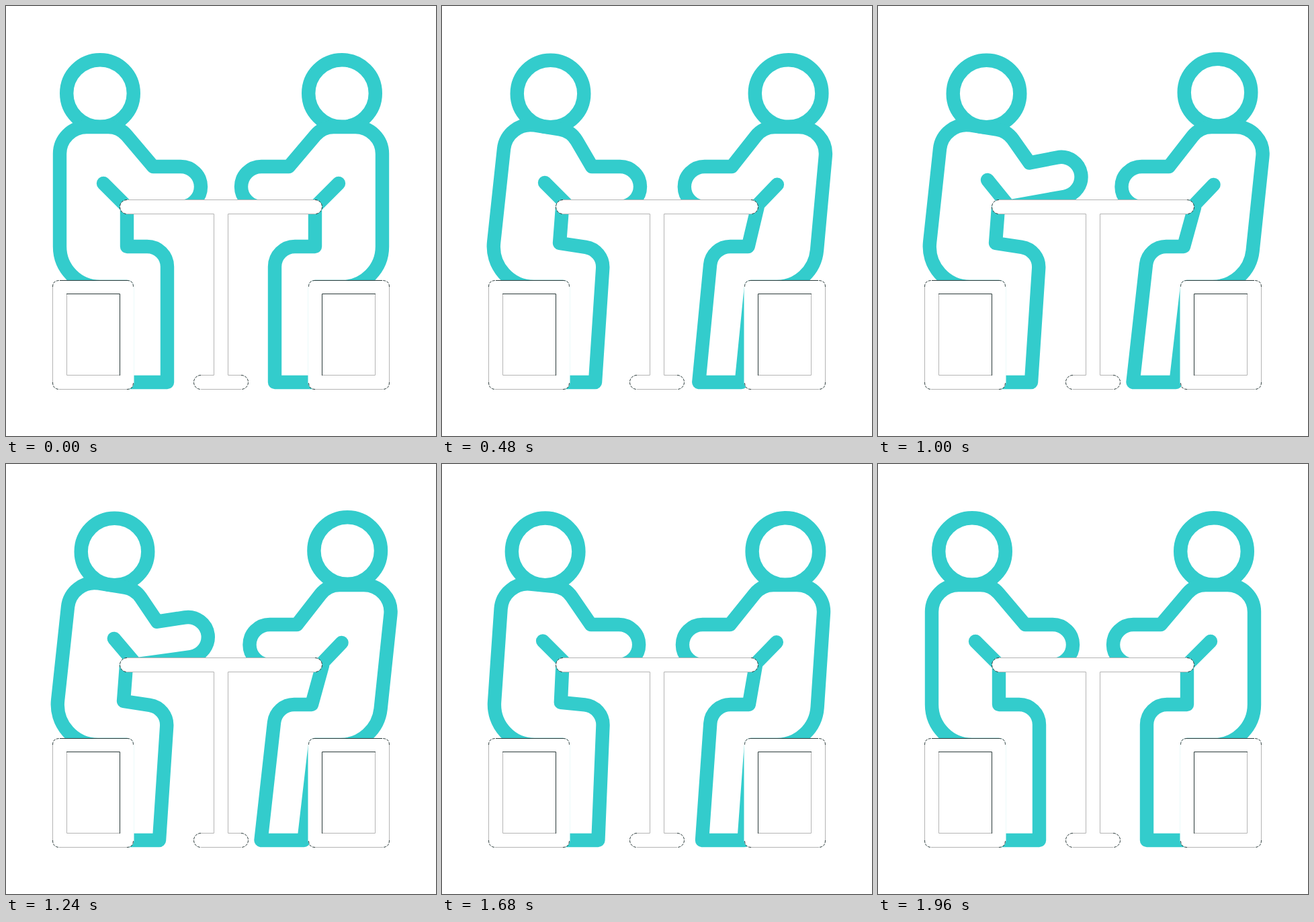
Animation of 640x640 px, one loop 2000 ms. Source, as an HTML page:

```html
<!DOCTYPE html>
<html lang="en">
<head>
<meta charset="utf-8">
<title>Table talk</title>
<style>
  html, body { margin: 0; width: 100%; height: 100%; overflow: hidden; background: #fff; }
  svg { display: block; width: 100vw; height: 100vh; }
  .person { fill: none; stroke: #33cccc; stroke-width: 20.4; stroke-linecap: round; stroke-linejoin: round; }
  .solid { fill: #fff; }
  .line { fill: none; stroke: #b4b4b4; }
  .dark { fill: none; stroke: #2b3a3a; }
  .dash { stroke-dasharray: 4 1.5; }
</style>
</head>
<body>
<svg viewBox="0 0 640 640">
  <defs>
    <g id="chair">
      <rect class="solid" x="69.5" y="408" width="121" height="162.5" rx="10"/>
      <path class="line" d="M69.5 418V560M80 570.5H180M90.5 428V549.5H169"/>
      <path class="dark" d="M80 408.5H180M90 428.5H169.5V550"/>
      <path class="dark dash" d="M69.5 418Q69.5 408.5 80 408.5M180 408.5Q189.5 408.5 189.5 418M69.5 560Q69.5 570.5 80 570.5M180 570.5Q189.5 570.5 189.5 560"/>
    </g>
  </defs>
  <g id="left" class="person"><circle r="49.8"/><path/></g>
  <g id="right" class="person" transform="translate(640) scale(-1 1)"><circle r="49.8"/><path/></g>
  <use href="#chair"/>
  <use href="#chair" transform="translate(640) scale(-1 1)"/>
  <g class="solid">
    <rect x="169.5" y="288.5" width="301" height="21" rx="10.5"/>
    <rect x="309.5" y="300" width="21" height="260"/>
    <rect x="280" y="549.5" width="80" height="21" rx="10.5"/>
  </g>
  <path class="line" d="M180 288.5H460M180 309.5H309.5V549.5H290M460 309.5H330.5V549.5H350M290 570.5H350"/>
  <path class="dark dash" d="M180 288.5a10.5 10.5 0 0 0 0 21M460 288.5a10.5 10.5 0 0 1 0 21M290 549.5a10.5 10.5 0 0 0 0 21M350 549.5a10.5 10.5 0 0 1 0 21"/>
</svg>
<script>
const LOOP = 2000, STEP = 40;

// Joints of a person facing right: x, y and an optional corner radius.
const joints = {
  head: [140, 130],
  seat: [180, 418], hip: [80, 418, 60], shoulder: [80, 180, 40], chest: [169, 180, 36],
  elbow: [219, 239], fingers: [290, 239, 30], palm: [290, 299, 30], wrist: [180, 299], cuff: [145, 264],
  waist: [180, 299], lap: [180, 358], knee: [240, 358, 30], toe: [240, 560], heel: [180, 560]
};
const limbs = [
  ["seat", "hip", "shoulder", "chest", "elbow", "fingers", "palm", "wrist", "cuff"],
  ["waist", "lap", "knee", "toe", "heel", "seat"]
];

// Each move says how far it shifts the joints it touches.
const leanIn = {
  head: [21.5, 0.5], shoulder: [16.5, -9], hip: [-10, 0], chest: [23, 6],
  elbow: [4, 0], fingers: [5, 0], palm: [5, 0], wrist: [8, -1], cuff: [8, -1],
  waist: [-1, 1], lap: [-5, -5], knee: [1, 5], toe: [-12, 0]
};
const raiseHand = {
  elbow: [2.5, -5.5], fingers: [2, -19.5], palm: [12, -20.5], wrist: [7, 0.5], cuff: [10, -4]
};
const leanBack = {
  head: [-18, 0], shoulder: [-17, 0], hip: [8, 0], chest: [-8, 0],
  elbow: [-12, 0], fingers: [-12.5, 0], palm: [-12.5, 0], wrist: [-8, 0], cuff: [-4.5, 2],
  waist: [-11, 1], lap: [5, 0], knee: [-2, 0], toe: [20.5, 0], heel: [16.5, 0]
};
const nod = { head: [12.5, -1.3] };

function ease(t, start, end) {
  const x = Math.min(1, Math.max(0, (t - start) / (end - start)));
  return x * x * (3 - 2 * x);
}

function place(name, moves) {
  let [x, y, r = 0] = joints[name];
  for (const [move, amount] of moves) {
    const [dx, dy] = move[name] || [0, 0];
    x += dx * amount;
    y += dy * amount;
  }
  return { x, y, r };
}

function toward(from, to, distance) {
  const k = distance / Math.hypot(to.x - from.x, to.y - from.y);
  return `${from.x + (to.x - from.x) * k} ${from.y + (to.y - from.y) * k}`;
}

// A polyline whose corners are rounded by each point's radius.
function roundedLine(points) {
  return points.map((p, i) => {
    const command = i ? "L" : "M";
    if (!p.r) return `${command}${p.x} ${p.y}`;
    const a = points[i - 1], b = points[i + 1];
    const angle = Math.acos(
      ((a.x - p.x) * (b.x - p.x) + (a.y - p.y) * (b.y - p.y)) /
      (Math.hypot(a.x - p.x, a.y - p.y) * Math.hypot(b.x - p.x, b.y - p.y))
    );
    const cut = p.r / Math.tan(angle / 2);
    return `${command}${toward(p, a, cut)}A${p.r} ${p.r} 0 0 1 ${toward(p, b, cut)}`;
  }).join("");
}

function drawPerson(id, moves) {
  const [circle, path] = document.getElementById(id).children;
  const head = place("head", moves);
  circle.setAttribute("cx", head.x);
  circle.setAttribute("cy", head.y);
  path.setAttribute("d", limbs.map(limb => roundedLine(limb.map(name => place(name, moves)))).join(""));
}

function draw(time) {
  const t = Math.floor(time % LOOP / STEP) * STEP;
  const settle = ease(t, 1520, 1910);
  const gesture = ease(t, 600, 1000) - ease(t, 1120, 1520);
  drawPerson("left", [[leanIn, ease(t, 80, 320) - settle], [raiseHand, gesture]]);
  drawPerson("right", [[leanBack, ease(t, 80, 600) - settle], [nod, gesture]]);
}

const begin = performance.now();
function tick() {
  draw(performance.now() - begin);
  requestAnimationFrame(tick);
}
tick();
</script>
</body>
</html>
```
